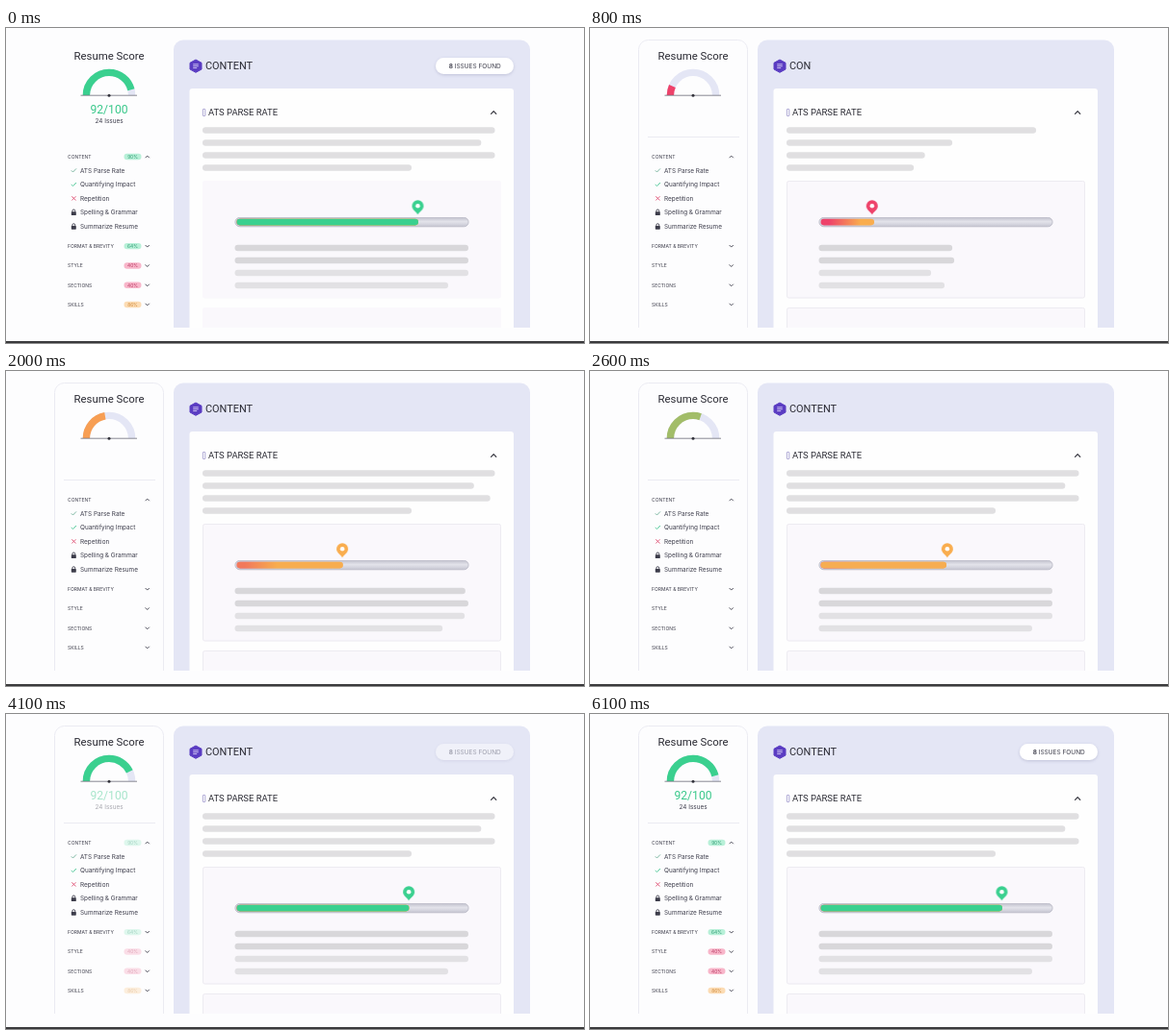
These frames come from a looping animation (600 by 328 pixels, 6.2 s). An HTML page:

```html
<!DOCTYPE html>
<html lang="en">
<head>
<meta charset="utf-8">
<title>Resume Score</title>
<style>
  html, body { margin: 0; width: 100%; height: 100%; overflow: hidden; background: #fdfdfe; }
  svg { display: block; width: 600px; height: 328px; }

  /* Every part shares one clock; the loop opens on the last 100 ms of the cycle. */
  .anim { animation: 6200ms linear -6100ms infinite; }

  text { font-family: Inter, sans-serif; fill: #3c3c4a; }
  .head { font-family: Roboto, sans-serif; fill: #2a2a33; }
  .item { font-size: 6.4px; }
  .group { font-size: 5px; }
  .pct { font-size: 4.8px; text-anchor: middle; }
  .icon { fill: none; stroke-linecap: round; stroke-linejoin: round; }

  .edge { animation-name: edge; }
  .line { height: 6.4px; rx: 3.2px; fill: #e0dfe1; width: var(--w); animation-name: grow; }
  .dark { fill: #d8d7da; }
  .soft { fill: #e2e1e4; }
  .typed { animation-name: type; animation-timing-function: step-end; }
  .arc { animation-name: arc; }
  .fill { animation-name: fill; }
  .amber { animation-name: fill, amber; }
  .green { animation-name: fill, green; }
  .pin { animation-name: pin, tint; }
  .reveal { animation-name: reveal; }

  @keyframes edge {
    0%, 98.38% { opacity: 1; }
    98.387%, 100% { opacity: 0; }
  }
  @keyframes grow {
    0% { width: 0; }
    11.29% { width: var(--a); }
    22.58% { width: var(--b); }
    32.26%, 100% { width: var(--w); }
  }
  @keyframes type {
    0% { width: 0; }
    5.5% { width: 7.2px; }
    7.8% { width: 14.6px; }
    10.1% { width: 22.4px; }
    12.4% { width: 28.9px; }
    14.8% { width: 35.1px; }
    17.1% { width: 42.9px; }
    19.4%, 100% { width: 60px; }
  }
  @keyframes arc {
    0% { stroke-dashoffset: 180; stroke: #ee426a; }
    11.29% { stroke-dashoffset: 156; }
    22.58% { stroke-dashoffset: 125; stroke: #ee426a; }
    32.26% { stroke: #f9b04f; }
    40.32% { stroke-dashoffset: 71; stroke: #a2bd68; }
    48% { stroke: #3ad08f; }
    56.45% { stroke-dashoffset: 35; }
    74%, 100% { stroke-dashoffset: 14.4; stroke: #3ad08f; }
  }
  @keyframes fill {
    0% { width: 0; }
    11.29% { width: 55.5px; }
    22.58% { width: 93.5px; }
    40.32% { width: 130.5px; }
    56.45% { width: 167px; }
    71%, 100% { width: 188.5px; }
  }
  @keyframes amber {
    0%, 22.58% { opacity: 0; }
    38%, 100% { opacity: 1; }
  }
  @keyframes green {
    0%, 42% { opacity: 0; }
    54%, 100% { opacity: 1; }
  }
  @keyframes pin {
    0% { transform: translateX(239px); }
    11.29% { transform: translateX(292.7px); }
    22.58% { transform: translateX(331px); }
    40.32% { transform: translateX(370.8px); }
    56.45% { transform: translateX(406.5px); }
    71%, 100% { transform: translateX(427.5px); }
  }
  @keyframes tint {
    0%, 13% { fill: #ee426a; }
    21%, 49% { fill: #f9ad4e; }
    59%, 100% { fill: #3ad08f; }
  }
  @keyframes reveal {
    0%, 58% { opacity: 0; }
    73%, 100% { opacity: 1; }
  }
</style>
</head>
<body>
<svg viewBox="0 0 600 328">
  <defs>
    <clipPath id="stage"><rect width="600" height="312"/></clipPath>
    <clipPath id="typing"><rect class="anim typed" x="207" y="28" width="60" height="22"/></clipPath>
    <linearGradient id="warm" gradientUnits="userSpaceOnUse" x1="248" x2="281">
      <stop stop-color="#ee426a"/><stop offset="1" stop-color="#f9ad4e"/>
    </linearGradient>
    <linearGradient id="groove" x2="0" y2="1">
      <stop stop-color="#c3c3cf"/><stop offset=".45" stop-color="#e3e3ea"/><stop offset="1" stop-color="#c6c6d2"/>
    </linearGradient>
    <filter id="shadow" x="-20%" y="-40%" width="140%" height="200%">
      <feDropShadow dx="0" dy="1" stdDeviation="1.6" flood-color="#6a6a90" flood-opacity=".28"/>
    </filter>
    <path id="down" class="icon" d="M-1.8 -.9L0 .9L1.8 -.9" stroke="#3c3c4a" stroke-width=".9"/>
    <path id="check" class="icon" d="M-2.2 .2L-.8 1.6L2.4 -1.7" stroke-width=".9"/>
    <g id="lock">
      <rect x="-2.5" y="-.7" width="5" height="3.7" rx=".6" fill="#3c3c4a"/>
      <path class="icon" d="M-1.4 -.7V-1.6A1.4 1.4 0 0 1 1.4 -1.6V-.7" stroke="#3c3c4a" stroke-width=".9"/>
    </g>
  </defs>

  <rect width="600" height="328" fill="#fdfdfe"/>
  <rect y="326" width="600" height="2" fill="#3a3a3c"/>

  <g clip-path="url(#stage)">
    <!-- Sidebar -->
    <g class="anim edge" fill="none" stroke="#ebebf2">
      <rect x="50.5" y="12.5" width="113" height="320" rx="10"/>
      <path d="M60 113.5H155"/>
    </g>
    <text class="head" x="107" y="33" font-size="11.4" text-anchor="middle">Resume Score</text>

    <g fill="none" stroke-width="7.4">
      <path d="M83.4 70A23.6 23.6 0 0 1 130.6 70" stroke="#e4e6f5"/>
      <path class="anim arc" d="M83.4 70A23.6 23.6 0 0 1 130.6 70" pathLength="180" stroke-dasharray="180 360"/>
    </g>
    <path d="M77.5 70.2H136" stroke="#6a6a76" stroke-width=".8"/>
    <circle cx="107" cy="70.2" r="1.5" fill="#33333c"/>

    <g class="anim reveal" text-anchor="middle">
      <text class="head" x="107" y="88.8" font-size="12.1" style="fill:#3ac88b">92/100</text>
      <text class="item" x="107" y="99">24 Issues</text>
    </g>

    <g class="group">
      <text x="64" y="135.9">CONTENT</text>
      <text x="64" y="228.9">FORMAT &amp; BREVITY</text>
      <text x="64" y="249.3">STYLE</text>
      <text x="64" y="269.6">SECTIONS</text>
      <text x="64" y="289.9">SKILLS</text>
    </g>
    <use href="#down" transform="translate(146.7 134) scale(1 -1)"/>
    <use href="#down" x="146.7" y="227.2"/>
    <use href="#down" x="146.7" y="247.6"/>
    <use href="#down" x="146.7" y="267.9"/>
    <use href="#down" x="146.7" y="288"/>

    <g class="item">
      <text x="77" y="150.6">ATS Parse Rate</text>
      <text x="77" y="165.3">Quantifying Impact</text>
      <text x="77" y="179.7">Repetition</text>
      <text x="77" y="194.3">Spelling &amp; Grammar</text>
      <text x="77" y="209">Summarize Resume</text>
    </g>
    <use href="#check" x="70.3" y="148.4" stroke="#6fae98"/>
    <use href="#check" x="70.3" y="163" stroke="#45c592"/>
    <path class="icon" d="M68.6 175.6l3.6 3.6m0 -3.6l-3.6 3.6" stroke="#df4a70" stroke-width=".9"/>
    <use href="#lock" x="70.3" y="192"/>
    <use href="#lock" x="70.3" y="206.7"/>

    <g class="anim reveal">
      <g fill="#b8f0d8">
        <rect x="122.5" y="130.8" width="18" height="6.4" rx="3.2"/>
        <rect x="122.5" y="223.9" width="18" height="6.4" rx="3.2"/>
      </g>
      <g fill="#f8b6ca">
        <rect x="122.5" y="244.3" width="18" height="6.4" rx="3.2"/>
        <rect x="122.5" y="264.6" width="18" height="6.4" rx="3.2"/>
      </g>
      <rect x="122.5" y="284.8" width="18" height="6.4" rx="3.2" fill="#fcdcb4"/>
      <g class="pct">
        <text x="131.5" y="135.8" style="fill:#2f9c74">90%</text>
        <text x="131.5" y="228.9" style="fill:#2f9c74">64%</text>
        <text x="131.5" y="249.3" style="fill:#b83a64">40%</text>
        <text x="131.5" y="269.6" style="fill:#b83a64">40%</text>
        <text x="131.5" y="289.8" style="fill:#d08a3c">86%</text>
      </g>
    </g>

    <!-- Main panel -->
    <rect x="174" y="12.5" width="370" height="320" rx="10" fill="#e4e6f5"/>
    <path d="M197 33L203 36.3V43L197 46.3L191 43V36.3Z" fill="#5a3cc2" stroke="#5a3cc2" stroke-linejoin="round"/>
    <path class="icon" d="M194.6 37.8H199.4M194.6 39.7H199.4M194.6 41.6H197.8" stroke="#d9d0f6" stroke-width=".9"/>
    <text class="head" x="207" y="43.4" font-size="10.9" clip-path="url(#typing)">CONTENT</text>

    <g class="anim reveal">
      <rect x="446" y="31" width="81" height="17" rx="8.5" fill="#fff" filter="url(#shadow)"/>
      <text x="486.7" y="41.9" font-size="6.5" text-anchor="middle"><tspan font-weight="700">8</tspan> ISSUES FOUND</text>
    </g>

    <rect x="190.5" y="63" width="336.5" height="260" rx="3" fill="#fefefe"/>
    <rect x="204.4" y="84.4" width="2.4" height="7.2" rx=".6" fill="none" stroke="#8f86c4" stroke-width=".7"/>
    <text class="head" x="210" y="91.3" font-size="9.45">ATS PARSE RATE</text>
    <path class="icon" d="M503.6 89.3L506.2 86.7L508.8 89.3" stroke="#33333c" stroke-width="1.2"/>

    <rect class="anim line" x="204" y="103.3" style="--a:259px;--b:303.5px;--w:303.5px"/>
    <rect class="anim line" x="204" y="116.3" style="--a:172px;--b:244px;--w:289.3px"/>
    <rect class="anim line" x="204" y="129.3" style="--a:143.5px;--b:274.3px;--w:303.5px"/>
    <rect class="anim line" x="204" y="142.3" style="--a:132px;--b:217px;--w:217px"/>

    <g fill="#faf8fc">
      <rect x="204" y="159" width="310" height="122.5" rx="2"/>
      <rect x="204" y="291" width="310" height="40" rx="2"/>
    </g>
    <g class="anim edge" fill="none" stroke="#edebf1">
      <rect x="204.5" y="159.5" width="309" height="121.5" rx="2"/>
      <rect x="204.5" y="291.5" width="309" height="40" rx="2"/>
    </g>

    <!-- Progress -->
    <rect x="237.9" y="197.4" width="242.2" height="9.4" rx="4.7" fill="url(#groove)" stroke="#b6b6c3" stroke-width=".8"/>
    <rect class="anim fill" x="239.5" y="198.8" height="6.6" rx="3.3" fill="url(#warm)"/>
    <rect class="anim amber" x="239.5" y="198.8" height="6.6" rx="3.3" fill="#f6ad52"/>
    <rect class="anim green" x="239.5" y="198.8" height="6.6" rx="3.3" fill="#3ad08f"/>
    <g class="anim pin">
      <path d="M0 194.5C-1.5 191.5 -6 189.5 -6 185.3A6 6 0 0 1 6 185.3C6 189.5 1.5 191.5 0 194.5Z"/>
      <circle cy="185.2" r="2.3" fill="#fff"/>
    </g>

    <rect class="anim line dark" x="237.5" y="225.8" style="--a:138.5px;--b:223.5px;--w:242.5px"/>
    <rect class="anim line dark" x="237.5" y="238.8" style="--a:140.5px;--b:242.5px;--w:242.5px"/>
    <rect class="anim line soft" x="237.5" y="251.8" style="--a:116.5px;--b:219.5px;--w:242.5px"/>
    <rect class="anim line soft" x="237.5" y="264.8" style="--a:130.5px;--b:186.5px;--w:221.5px"/>
  </g>
</svg>
</body>
</html>
```
